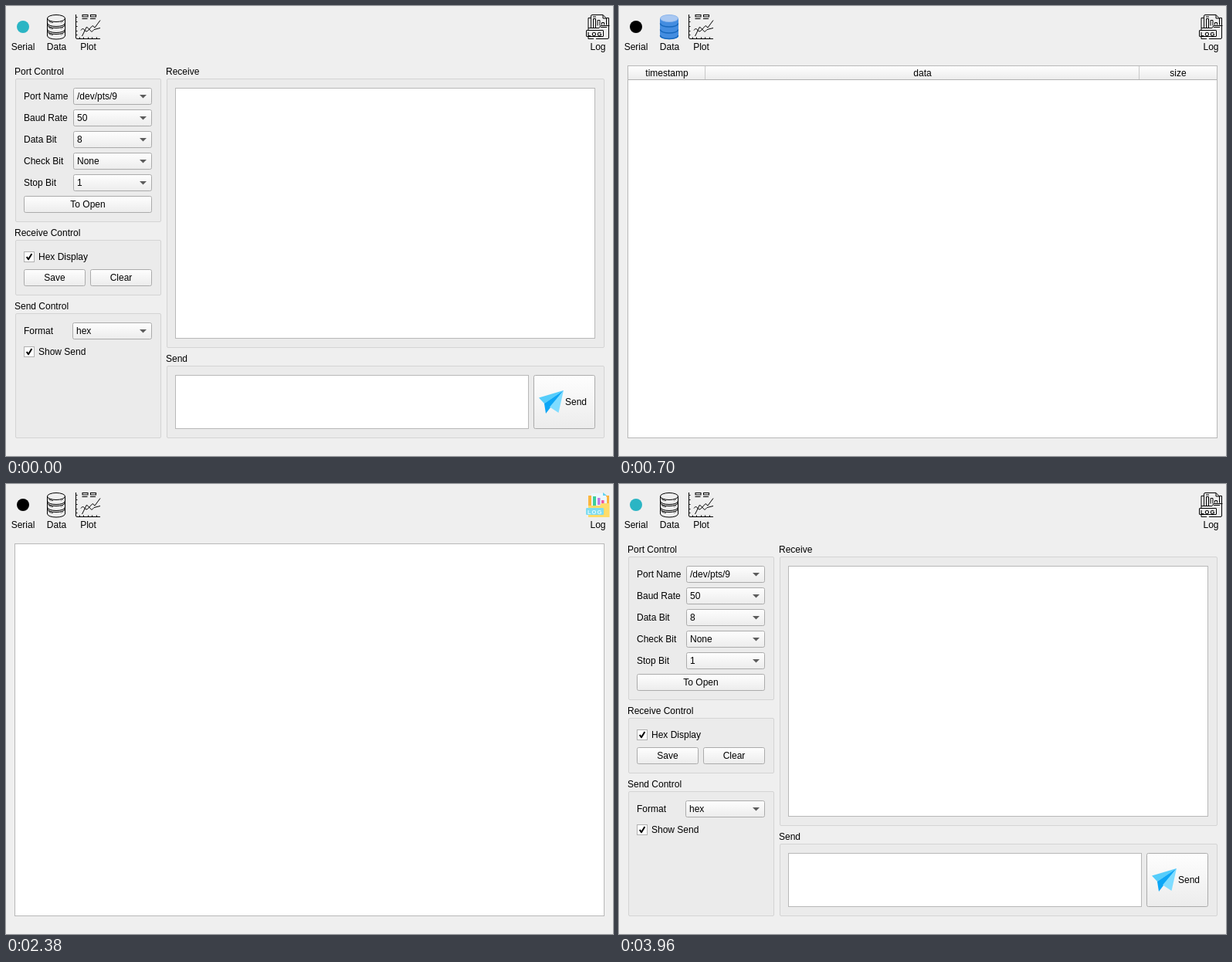
An HTML page that plays this animation: 786 px wide and 583 px high, repeating every 4800 ms.

```html
<!DOCTYPE html>
<html lang="en">
<head>
<meta charset="utf-8">
<title>Serial tool</title>
<style>
  html, body { margin: 0; width: 100%; height: 100%; overflow: hidden; background: #efefef; }
  svg { display: block; width: 786px; height: 583px; font: 12px "Liberation Sans", Arial, sans-serif; }
  text { white-space: pre; }
  .chart text { fill: #404044; }
</style>
</head>
<body>
<svg id="stage" viewBox="0 0 786 583"></svg>
<script>
const LOOP = 4800;
const timeline = [[700, "serial"], [1300, "data"], [1900, "plot"], [2700, "log"], [LOOP, "serial"]];

// Corners are given as the first and last pixel of the border.
const box = (x, y, x2, y2, fill, stroke, r = 0) =>
  `<rect x="${x + .5}" y="${y + .5}" width="${x2 - x}" height="${y2 - y}" rx="${r}" fill="${fill}" stroke="${stroke}"/>`;
const fillBox = (x, y, w, h, fill, r = 0) =>
  `<rect x="${x}" y="${y}" width="${w}" height="${h}" rx="${r}" fill="${fill}"/>`;
const label = (x, y, s, anchor = "start", more = "") =>
  `<text x="${x}" y="${y}" text-anchor="${anchor}" ${more}>${s}</text>`;
const mid = (x, y, s, more) => label(x, y, s, "middle", more);
const line = (d, stroke = "#000", w = 1) =>
  `<path d="${d}" fill="none" stroke="${stroke}" stroke-width="${w}" stroke-linejoin="round"/>`;
const shape = (d, fill) => `<path d="${d}" fill="${fill}"/>`;

// Widgets
const group = (title, x, y, x2, y2) =>
  label(x - 1, y - 5, title) + box(x, y, x2, y2, "#ebebeb", "#d4d4d4", 1.5);
const field = (x, y, x2, y2) => box(x, y, x2, y2, "#fff", "#b8b8b8");
const button = (x, y, x2, y2, s = "") =>
  box(x, y, x2, y2, "url(#face)", "#ababab", 2) + mid((x + x2 + 1) / 2, (y + y2 + 1) / 2 + 4, s);
const combo = (name, value, x, y) =>
  label(23, y + 15, name) + button(x, y, 188, y + 21) + label(x + 5, y + 15, value) +
  shape(`M173 ${y + 9}h9l-4.5 4.5z`, "#5c5c5c");
const check = (y, s) =>
  box(23, y, 36, y + 13, "#fff", "#b0b0b0") + label(42, y + 11, s) +
  line(`M26.8 ${y + 7}l2.2 3.3l4.4-7.2`, "#000", 2);

// Toolbar icons
const icons = {
  serial: on => `<circle cx="22" cy="27" r="8" fill="${on ? "#2bb5c4" : "#000"}"/>`,

  data(on) {
    const arc = y => `M53.5 ${y}c0 6 23 6 23 0`;
    const top = (fill, stroke) =>
      `<ellipse cx="65" cy="16" rx="11.5" ry="4.5" fill="${fill}" stroke="${stroke}"/>`;
    if (on) return shape("M53 16V39c0 5.5 24 5.5 24 0V16z", "#448de0") +
      [22.5, 30.5, 38].map(y => line(arc(y), "#1768bd", 1.5)).join("") + top("#a9c8f2", "#8db6ec");
    return top("none", "#000") + line("M53.5 16V39M76.5 16V39") +
      [22, 24, 30, 32, 38.5].map(y => line(arc(y))).join("") +
      [19.5, 27.5, 35.5].map(y => line(`M55 ${y}q3 2 6 2M71 ${y + 1.6}h1M73 ${y + .8}h1`, "#000", .8)).join("");
  },

  plot(on) {
    const [axis, red, blue] = on ? ["#0c6280", "#f2555c", "#49b5ec"] : ["#000", "#000", "#000"];
    const legend = (x, c) =>
      box(x, 11, x + 7, 13.5, on ? c : "none", c) + line(`M${x} 16.5h7`, c);
    return line("M90.5 11V41q0 1.5 1.5 1.5H122", axis) +
      line([14, 20, 26, 32, 37].map(y => `M91 ${y + .5}h1.5`).join(""), axis) +
      line([95, 100, 106, 111, 117].map(x => `M${x + .5} 40.5v2`).join(""), axis) +
      legend(98.5, red) + legend(109, blue) +
      line("M98.5 39L104.5 27L111 33.5L114 30.5L122 28.5", red) +
      line("M97 31.5L99.5 29L103.5 33L105.5 32.5L112 25.5L115 28L122 18.5", blue);
  },

  log(on) {
    const tag = (fill, stroke, ink) => box(751, 31, 773, 39, fill, stroke, .5) +
      label(753, 38.5, "LOG", "start", `font-size="7.5" font-weight="bold" letter-spacing="1" fill="${ink}"`);
    if (on) return shape("M754 15h4v14h-4zM777 15h4v12h-4z", "#fbb53c") +
      shape("M758 12H773L778 17V29H758z", "#edf8fd") + shape("M773 11v4h5z", "#62d3ee") +
      shape("M754 28H769L771 25H781.5V43H754z", "#ffdc69") +
      fillBox(760, 16, 4, 12, "#3fcf9b") + fillBox(766, 18, 3.5, 9, "#bb7de8") +
      fillBox(771, 21, 3.5, 4, "#f05a9b") + tag("#7edcf0", "#7edcf0", "#e8fbff");
    return line("M757.5 28V13q0-1.5 1.5-1.5H773L777.5 16V24.5M773 11.5V16H777.5") +
      line("M757.5 15.5H754V31M754 28.5H768L770 25.5H781.5M777.5 15.5H780.5V41q0 1.5-1.5 1.5H764M754 39.5V42.5H761") +
      line("M760.5 28V16.5H763.5V28M766 25.5V18.5H769V25.5M771.5 24.5V21.5H774.5V24.5M760 14H764M770 27.5H778") +
      tag("#efefef", "#000", "#000");
  }
};

const toolbar = active =>
  Object.keys(icons).map(k => icons[k](k === active)).join("") +
  mid(22, 57, "Serial") + mid(65.5, 57, "Data") + mid(106.5, 57, "Plot") + mid(766.5, 57, "Log");

const pages = {
  serial: () =>
    group("Port Control", 12, 94, 200, 279) +
    [["Port Name", "/dev/pts/9"], ["Baud Rate", "50"], ["Data Bit", "8"], ["Check Bit", "None"], ["Stop Bit", "1"]]
      .map(([name, value], i) => combo(name, value, 87, 106 + 28 * i)).join("") +
    button(23, 246, 188, 267, "To Open") +
    group("Receive Control", 12, 303, 200, 374) + check(318, "Hex Display") +
    button(23, 341, 102, 362, "Save") + button(109, 341, 188, 362, "Clear") +
    group("Send Control", 12, 398, 200, 559) + combo("Format", "hex", 86, 410) + check(441, "Show Send") +
    group("Receive", 208, 94, 774, 442) + field(219, 106, 762, 430) +
    group("Send", 208, 466, 774, 559) + field(219, 478, 676, 547) +
    button(683, 478, 762, 547) + label(724, 517, "Send") +
    shape("M690 507.5L722 498L697 515z", "#55cdfb") +
    shape("M697 515L722 498L699 528z", "#0ca6f6") +
    shape("M722 498L715.5 527L704 519.5z", "#7fdcff"),

  data: () =>
    field(11, 77, 774, 559) + fillBox(12, 78, 762, 17, "url(#face)") +
    line("M12 95.5H774", "#b0b0b0") + line("M111.5 78V95M673.5 78V95", "#c8c8c8") +
    mid(62, 91, "timestamp") + mid(393, 91, "data") + mid(724, 91, "size"),

  plot() {
    const at = [0, 1, 2, 3, 4], x = i => 88.5 + 160.4 * i, y = i => 131 + 89.75 * i;
    return `<g class="chart">` + fillBox(20, 86, 746, 465, "#fff", 4.5) +
      at.map(i => line(`M${x(i)} 131V494M84 ${y(i)}H730`, "#e2e2e2")).join("") +
      line("M88.5 131V490H730", "#d6d6d6", 1.3) +
      at.map(i => label(83, y(i) + 4.2, ["2.5", "1.3", "0.0", "-1.3", "-2.5"][i], "end") +
        mid(x(i) + .3, 506, (.05 * i).toFixed(3))).join("") +
      mid(392.7, 118, "Live ADC Waveform") + mid(409, 525, "Time (s)", `font-weight="bold"`) +
      mid(0, 0, "Voltage (V)", `font-weight="bold" transform="translate(54 310.5) rotate(-90)"`) + "</g>";
  },

  log: () => field(11, 77, 774, 559)
};

const stage = document.getElementById("stage");
stage.innerHTML =
  `<defs><linearGradient id="face" x2="0" y2="1"><stop stop-color="#fefefe"/><stop offset="1" stop-color="#ececec"/></linearGradient></defs>` +
  Object.keys(pages).map(k => `<g id="${k}" display="none">${toolbar(k)}${pages[k]()}</g>`).join("");

let shown;
function draw() {
  const t = performance.now() % LOOP;
  const page = timeline.find(([end]) => t < end)[1];
  if (page !== shown) {
    for (const k in pages) document.getElementById(k).setAttribute("display", k === page ? "inline" : "none");
    shown = page;
  }
  requestAnimationFrame(draw);
}
draw();
</script>
</body>
</html>
```
